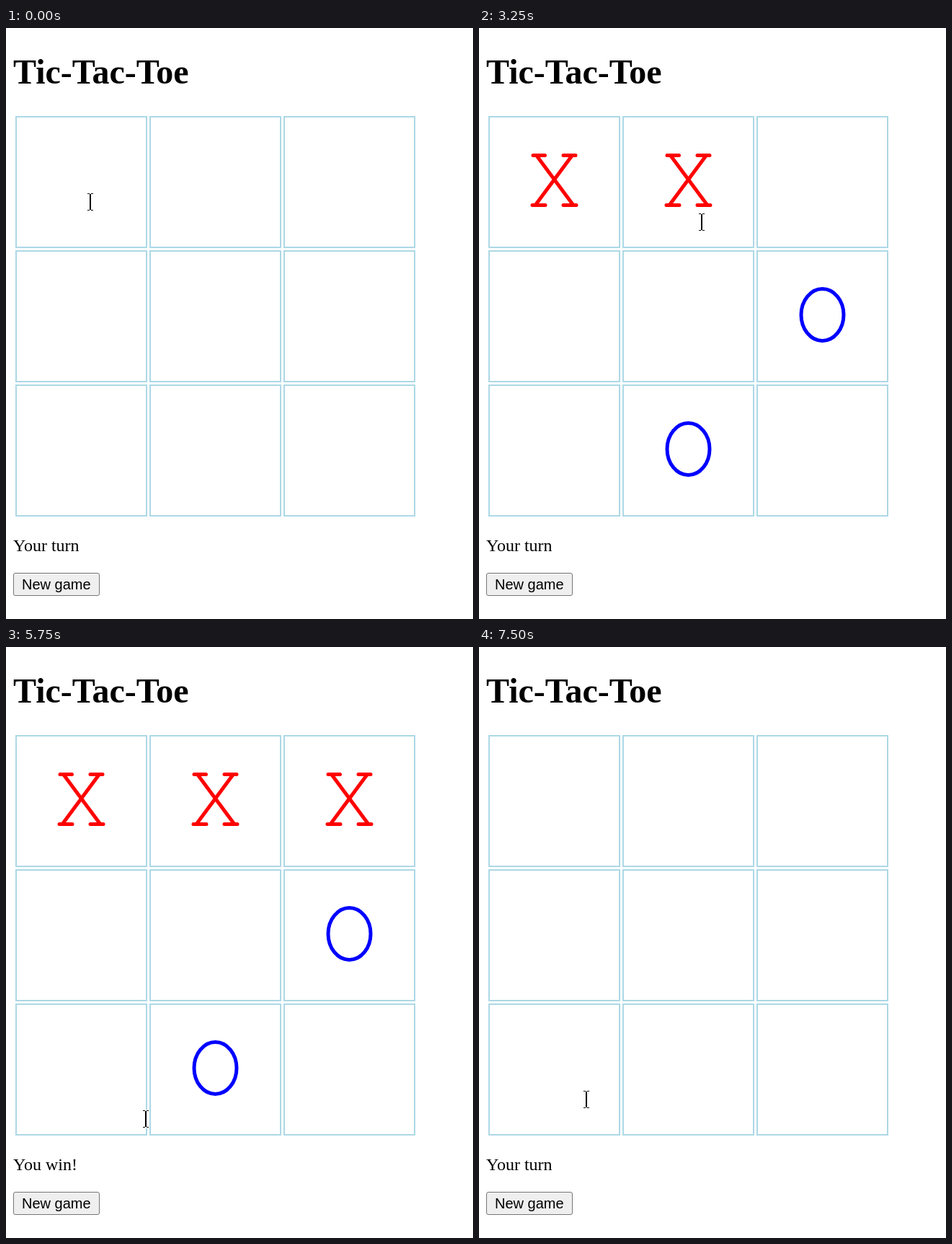
Write an HTML page that moves like this. It is 648 px wide and 819 px high and loops after 8000 ms.

```html
<!DOCTYPE html>
<html lang="en">
<head>
<meta charset="utf-8">
<title>Tic-Tac-Toe</title>
<style>
  html, body { margin: 0; width: 100%; height: 100%; overflow: hidden; background: #fff; }
  svg { display: block; width: 648px; height: 819px; }
  .serif { font-family: "Liberation Serif", "Times New Roman", serif; }
  .sans { font-family: "Liberation Sans", Arial, sans-serif; }
  .cell { fill: none; stroke: #add8e6; stroke-width: 2; }
  .mark { fill: none; stroke-width: 5; stroke-linecap: round; }
  .x { stroke: #f00; }
  .o { stroke: #00f; }
  .pointer { fill: #000; stroke: #fff; stroke-width: 2; paint-order: stroke; }
</style>
</head>
<body>
<svg viewBox="0 0 648 819">
  <defs>
    <!-- Marks are centred on their cell. -->
    <path id="x" class="mark x" d="M-29.5-37h16.5M12.5-37h17M-30.5 32h18M12.5 32h18M-24.5-36.5L26 31.5M24.5-36.5L-26 31.5"/>
    <ellipse id="o" class="mark o" cy="-2" rx="29.5" ry="36"/>
  </defs>
  <text class="serif" x="10" y="77" font-size="48" font-weight="bold">Tic-Tac-Toe</text>
  <g id="board"></g>
  <text id="status" class="serif" x="10" y="725" font-size="24"></text>
  <rect id="button" x="10.5" y="755.5" width="119" height="31" rx="2.5"/>
  <text class="sans" x="22" y="778" font-size="20">New game</text>
  <path id="pointer" class="pointer"/>
</svg>
<script>
const LOOP = 8000;
const NS = "http://www.w3.org/2000/svg";
const $ = id => document.getElementById(id);

const POINTERS = {
  beam: "M-4-12h3v1h2v-1h3v1h-3v22h3v1h-3v-1h-2v1h-3v-1h3v-22h-3z",
  arrow: "M0 0V24L5.5 19L10 29.5L14 28L9.5 18H17Z"
};
const BUTTON = {
  idle: ["#efefef", "#767676"],
  hover: ["#e5e5e5", "#4f4f4f"],
  pressed: ["#f5f5f5", "#8d8d8d"]
};

// [time, value]: each value holds until the next step
const pointerSteps = [
  [0, ["beam", 117, 241]],
  [250, ["beam", 120, 239]],
  [750, ["beam", 157, 248]],
  [1000, ["beam", 307, 265]],
  [1250, ["beam", 309, 269]],
  [4000, ["beam", 394, 238]],
  [4250, ["beam", 476, 224]],
  [5500, ["beam", 375, 352]],
  [5750, ["beam", 194, 654]],
  [6000, ["arrow", 106, 738]],
  [6250, ["arrow", 82, 756]],
  [6500, ["arrow", 82, 768]],
  [7250, ["arrow", 84, 761]],
  [7500, ["beam", 149, 627]]
];
const statusSteps = [
  [0, "Your turn"], [500, "Computer's turn"], [1250, "Your turn"],
  [2250, "Computer's turn"], [3250, "Your turn"], [5000, "You win!"],
  [7250, "Your turn"]
];
const buttonSteps = [
  [0, "idle"], [6500, "hover"], [7000, "pressed"], [7250, "hover"], [7500, "idle"]
];
const CLEAR_AT = 7250;
const moves = [[500, 0, "x"], [1250, 7, "o"], [2250, 1, "x"], [3250, 5, "o"], [5000, 2, "x"]];

function add(tag, attrs) {
  const el = document.createElementNS(NS, tag);
  for (const key in attrs) el.setAttribute(key, attrs[key]);
  return $("board").appendChild(el);
}

const cellX = i => 13 + 186 * (i % 3);
const cellY = i => 122 + 186 * Math.floor(i / 3);

for (let i = 0; i < 9; i++) {
  add("rect", { class: "cell", x: cellX(i) + 1, y: cellY(i) + 1, width: 181, height: 181 });
}
const marks = moves.map(([time, i, kind]) => ({
  time,
  el: add("use", { href: "#" + kind, x: cellX(i) + 91.5, y: cellY(i) + 91.5 })
}));

const valueAt = (steps, t) => steps.findLast(([time]) => time <= t)[1];

function draw(t) {
  for (const { time, el } of marks) {
    el.setAttribute("visibility", t >= time && t < CLEAR_AT ? "visible" : "hidden");
  }
  $("status").textContent = valueAt(statusSteps, t);

  const [fill, stroke] = BUTTON[valueAt(buttonSteps, t)];
  $("button").setAttribute("fill", fill);
  $("button").setAttribute("stroke", stroke);

  const [shape, x, y] = valueAt(pointerSteps, t);
  $("pointer").setAttribute("d", POINTERS[shape]);
  $("pointer").setAttribute("transform", `translate(${x} ${y})`);
}

const start = performance.now();
function tick() {
  draw((performance.now() - start) % LOOP);
  requestAnimationFrame(tick);
}
tick();
</script>
</body>
</html>
```
